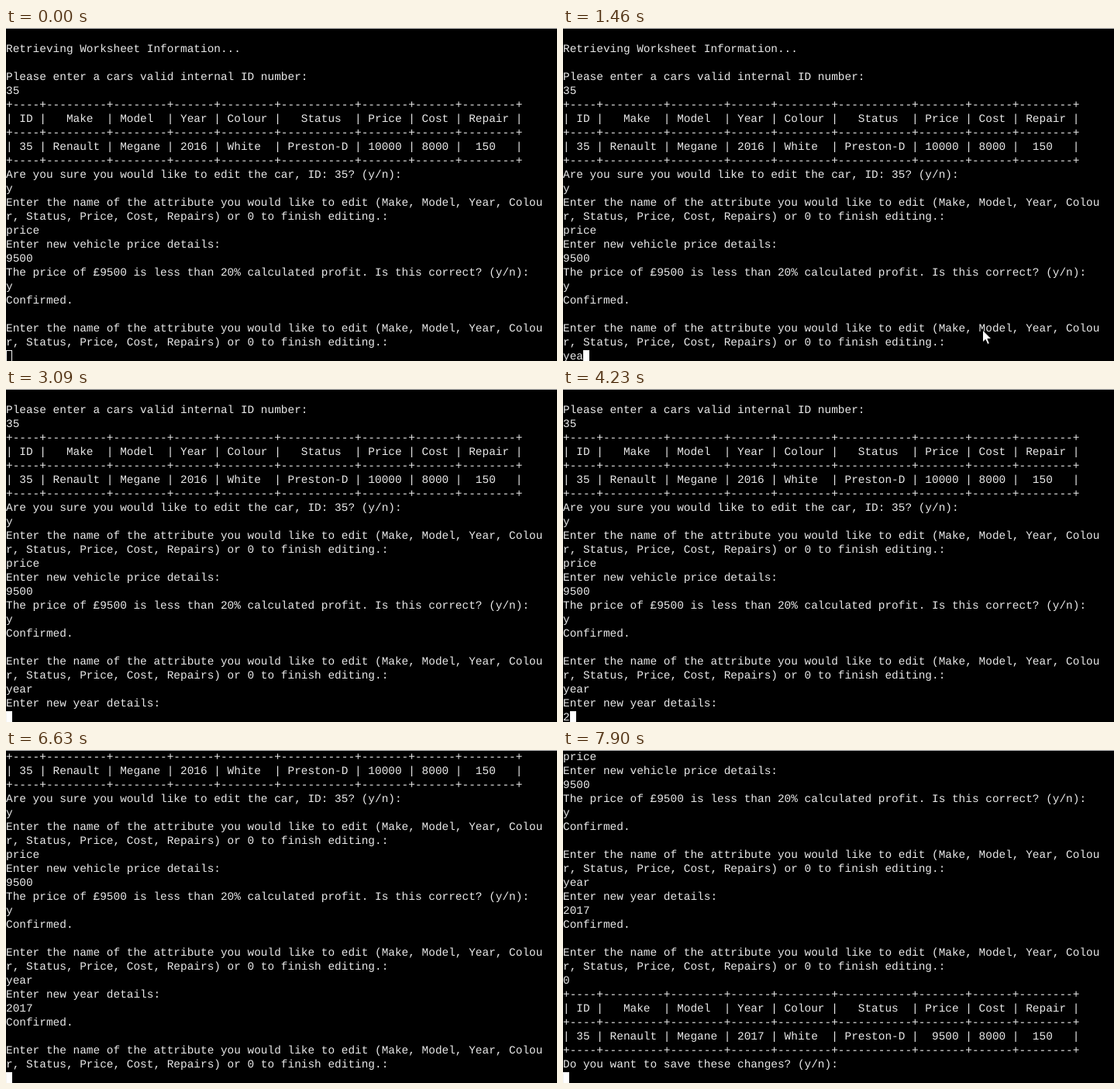
Animation of 711 by 429 pixels, one loop 7.99 s. Source, as an HTML page:

```html
<!DOCTYPE html>
<html lang="en">
<head>
<meta charset="utf-8">
<title>Terminal session</title>
<style>
  html, body { margin: 0; width: 100%; height: 100%; overflow: hidden; background: #000; }
  #stage { position: relative; width: 711px; height: 429px; overflow: hidden; background: #000; }
  #topEdge { position: absolute; left: 0; top: 0; width: 100%; height: 1px; background: #bdbdbd; }
  #screen {
    position: absolute; left: 0; top: 1px; margin: 0; color: #e9e9e9;
    font: 14.43px/18px "Liberation Mono", monospace;
    text-rendering: geometricPrecision; font-variant-ligatures: none;
  }
  #caret {
    position: absolute; left: 0; top: 415px; width: 8px; height: 18px;
    box-sizing: border-box; border: 1px solid #f4f4f4;
  }
  #caret.focused { background: #fff; }
  #pointer { position: absolute; left: 0; top: 0; }
</style>
</head>
<body>
<div id="stage">
  <div id="topEdge"></div>
  <pre id="screen"></pre>
  <div id="caret"></div>
  <svg id="pointer" width="14" height="21" viewBox="0 0 14 21">
    <path d="M.5 .5V16.5L4.2 13L6.8 19L9.4 17.9L6.9 12H12Z" fill="#fff" stroke="#000"/>
  </svg>
</div>
<script>
const LOOP = 7990, ROWS = 23, CHAR = 8.66;
const el = id => document.getElementById(id);
const screen = el("screen"), caret = el("caret"), pointer = el("pointer");

const wrap = text => text.match(/.{1,80}/g) || [""];
const rule = "+" + [4, 9, 8, 6, 8, 11, 7, 6, 8].map(n => "-".repeat(n)).join("+") + "+";
const table = (year, price) => [
  rule,
  "| ID |   Make  | Model  | Year | Colour |   Status  | Price | Cost | Repair |",
  rule,
  `| 35 | Renault | Megane | ${year} | White  | Preston-D | ${price.padStart(5)} | 8000 |  150   |`,
  rule
];
const prompt = wrap("Enter the name of the attribute you would like to edit " +
  "(Make, Model, Year, Colour, Status, Price, Cost, Repairs) or 0 to finish editing.:");

const history = [
  "", "Retrieving Worksheet Information...", "",
  "Please enter a cars valid internal ID number:", "35",
  ...table("2016", "10000"),
  "Are you sure you would like to edit the car, ID: 35? (y/n):", "y",
  ...prompt, "price",
  "Enter new vehicle price details:", "9500",
  "The price of £9500 is less than 20% calculated profit. Is this correct? (y/n):", "y",
  "Confirmed.", "", ...prompt
];

// Each entry: keystroke times, typed text, time of Enter, printed reply
const entries = [
  { keys: [980, 1150, 1380, 1560], text: "year", enter: 1750,
    reply: ["Enter new year details:"] },
  { keys: [4150, 4400, 4700, 4980], text: "2017", enter: 5750,
    reply: ["Confirmed.", "", ...prompt] },
  { keys: [7000], text: "0", enter: 7350,
    reply: [...table("2017", "9500"), "Do you want to save these changes? (y/n):"] }
];

const FOCUS = 700, MOVE_START = 350, MOVE_END = 650, POINTER_HIDE = 2550;

function terminalAt(t) {
  const lines = [...history];
  for (const { keys, text, enter, reply } of entries) {
    if (t < enter) return { lines, typed: text.slice(0, keys.filter(k => t >= k).length) };
    lines.push(text, ...reply);
  }
  return { lines, typed: "" };
}

let shown = "";
function draw() {
  const t = performance.now() % LOOP;
  const { lines, typed } = terminalAt(t);
  const content = [...lines.slice(-ROWS), typed].join("\n");
  if (content !== shown) screen.textContent = shown = content;

  caret.style.left = Math.round(typed.length * CHAR) + "px";
  caret.className = t >= FOCUS ? "focused" : "";

  const p = Math.min(1, Math.max(0, (t - MOVE_START) / (MOVE_END - MOVE_START)));
  const left = (1 - p) ** 2;
  pointer.style.transform = `translate(${541 + 50 * left}px, ${388.5 + 42 * left}px)`;
  pointer.style.visibility = t >= MOVE_START && t < POINTER_HIDE ? "visible" : "hidden";
  requestAnimationFrame(draw);
}
draw();
</script>
</body>
</html>
```
